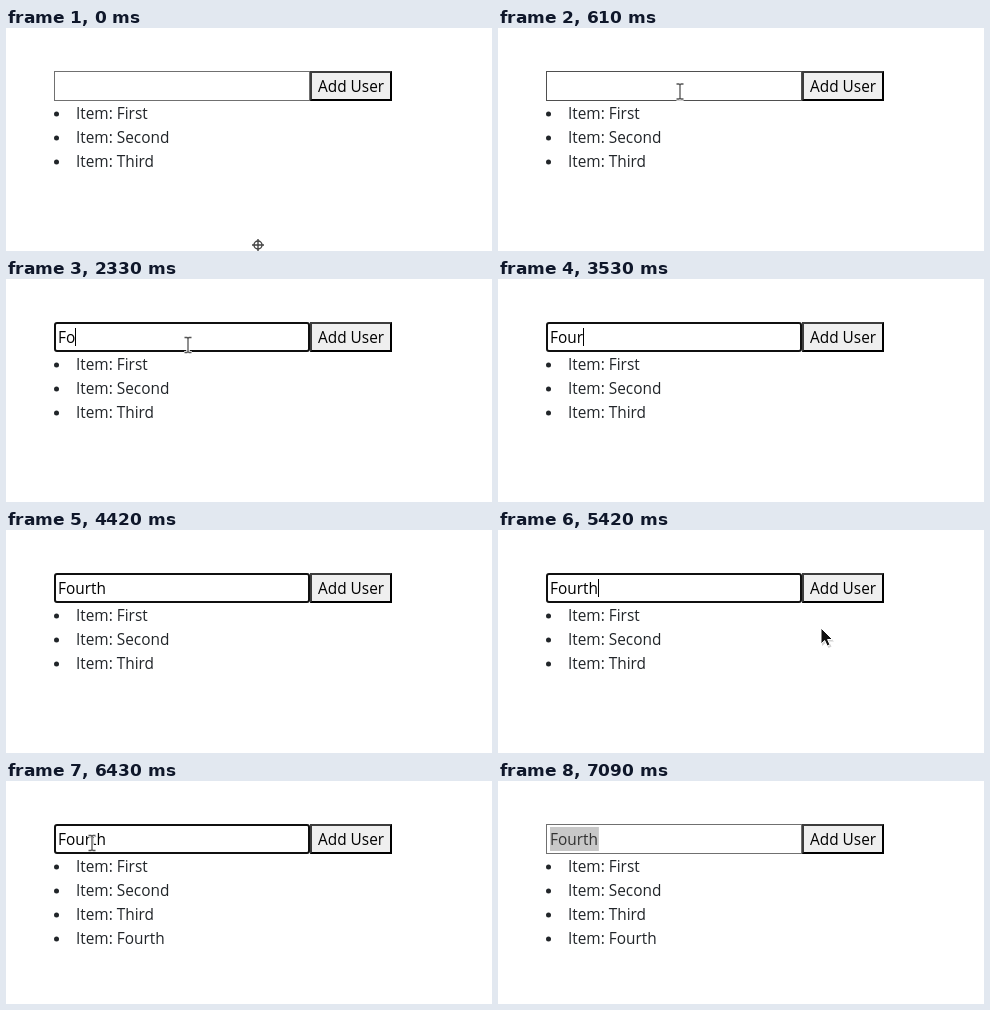
These frames come from a looping animation (486x223 px, 8 s). An HTML page:

```html
<!DOCTYPE html>
<html lang="en">
<head>
<meta charset="utf-8">
<title>Add User</title>
<style>
  html, body { margin: 0; width: 100%; height: 100%; overflow: hidden; background: #fff; }
  svg { display: block; width: 486px; height: 223px; }
  text { font: 15.4px "Open Sans", "Noto Sans", sans-serif; fill: #212529; }
  .control { fill: #000; }
  .mark { display: none; }
</style>
</head>
<body>
<svg viewBox="0 0 486 223">
  <rect id="field" fill="#fff"/>
  <rect id="selection" x="52" y="46" height="24" fill="#c8c8c8"/>
  <text id="value" class="control" x="52" y="64"></text>
  <rect id="caret" y="49" width="1" height="18"/>

  <rect x="304" y="43" width="82" height="30" fill="#000"/>
  <path d="M304 73V43H386L384 45H306V71Z" fill="#3c3c3c"/>
  <rect id="face" x="306" y="45" width="78" height="26"/>
  <text class="control" x="312" y="64">Add User</text>

  <g id="list"></g>

  <g id="cross" class="mark" fill="none" stroke="#444" stroke-width="1.4">
    <circle r="4"/>
    <path d="M-6 0H6M0-6V6"/>
  </g>
  <g id="beam" class="mark" fill="none">
    <path id="stem" d="M-3.5-7.5H-1L0-6.5 1-7.5H3.5M0-6.5V6.5M-3.5 7.5H-1L0 6.5 1 7.5H3.5" stroke="#fff" stroke-width="3"/>
    <use href="#stem"/>
    <path d="M-3.5-7.5H-1L0-6.5 1-7.5H3.5M0-6.5V6.5M-3.5 7.5H-1L0 6.5 1 7.5H3.5" stroke="#555" stroke-width="1.3"/>
  </g>
  <g id="arrow" class="mark">
    <path d="M1 2V18L5 14.5 7.5 20 10.5 18.500 8 13.500H13Z" fill="#000" opacity=".18"/>
    <path d="M0 0V16L3.700 12.500 6.200 18 9 16.700 6.600 11.500H11.500Z" fill="#111" stroke="#fff" stroke-width="1"/>
  </g>
</svg>
<script>
const LOOP = 8000;
const $ = id => document.getElementById(id);
const pointers = ['cross', 'beam', 'arrow'];

// Each step: start time, then the properties that change.
const steps = [
  [0, { pointer: ['cross', 252, 217], text: '', border: 'idle', caret: false, items: 3, selected: false, pressed: false }],
  [120, { pointer: ['arrow', 243, 196] }],
  [220, { pointer: ['arrow', 224, 163] }],
  [310, { pointer: ['arrow', 206, 126] }],
  [410, { pointer: ['arrow', 191, 92] }],
  [510, { pointer: ['beam', 184, 68], border: 'hover' }],
  [610, { pointer: ['beam', 182, 63.5] }],
  [710, { pointer: ['beam', 182, 66], border: 'focus', caret: true }],
  [1320, { caret: false }],
  [1920, { caret: true }],
  [2130, { text: 'F' }],
  [2330, { text: 'Fo' }],
  [2440, { text: 'For' }],
  [2740, { text: 'F', pointer: null }],
  [2830, { text: '' }],
  [2920, { text: 'F' }],
  [3010, { text: 'Fo' }],
  [3330, { text: 'Fou' }],
  [3530, { text: 'Four' }],
  [3720, { text: 'Fourt' }],
  [3820, { text: 'Fourth' }],
  [4420, { caret: false }],
  [5030, { caret: true }],
  [5220, { pointer: ['arrow', 300, 115] }],
  [5320, { pointer: ['arrow', 314, 108] }],
  [5420, { pointer: ['arrow', 323, 98] }],
  [5530, { pointer: ['arrow', 329, 74] }],
  [5620, { pointer: ['arrow', 330, 62], pressed: true, caret: false }],
  [5760, { border: 'idle', items: 4 }],
  [5850, { pointer: ['arrow', 318, 62] }],
  [5940, { pointer: ['beam', 284, 62], border: 'hover', pressed: false }],
  [6030, { pointer: ['beam', 244, 62.5] }],
  [6160, { pointer: ['beam', 180, 62] }],
  [6250, { pointer: ['beam', 128, 62] }],
  [6340, { pointer: ['beam', 98, 62] }],
  [6430, { pointer: ['beam', 86, 62], border: 'focus' }],
  [6570, { selected: true }],
  [6730, { pointer: null, border: 'idle' }]
];

const borders = {
  idle: ['#707070', 1, 0],
  hover: ['#4f4f4f', 1, 0],
  focus: ['#101010', 2, 2]
};

function set(el, attrs) {
  for (const key in attrs) el.setAttribute(key, attrs[key]);
}

$('list').innerHTML = ['First', 'Second', 'Third', 'Fourth'].map((name, i) =>
  `<g><circle cx="50.5" cy="${86 + 24 * i}" r="2.5" fill="#212529"/>` +
  `<text x="70" y="${91 + 24 * i}">Item: ${name}</text></g>`).join('');

function draw(state) {
  const [stroke, width, rx] = borders[state.border];
  set($('field'), {
    x: 48 + width / 2, y: 43 + width / 2, width: 256 - width, height: 30 - width,
    rx, stroke, 'stroke-width': width
  });
  $('value').textContent = state.text;
  $('value').style.fill = state.selected ? '#323232' : '#000';
  const length = state.text ? $('value').getComputedTextLength() : 0;
  set($('caret'), { x: Math.round(52 + length), opacity: +state.caret });
  set($('selection'), { width: length + 1, opacity: +state.selected });
  set($('face'), { fill: state.pressed ? '#e5e5e5' : '#efefef' });
  [...$('list').children].forEach((row, i) => set(row, { opacity: +(i < state.items) }));
  for (const id of pointers) {
    const shown = state.pointer && state.pointer[0] === id;
    $(id).style.display = shown ? 'inline' : 'none';
    if (shown) set($(id), { transform: `translate(${state.pointer[1]} ${state.pointer[2]})` });
  }
}

const start = performance.now();
let last = -1;

function tick(now) {
  const time = Math.max(0, now - start) % LOOP;
  const done = steps.filter(step => step[0] <= time);
  if (done.length !== last) {
    last = done.length;
    draw(Object.assign({}, ...done.map(step => step[1])));
  }
  requestAnimationFrame(tick);
}
tick(start);
</script>
</body>
</html>
```
